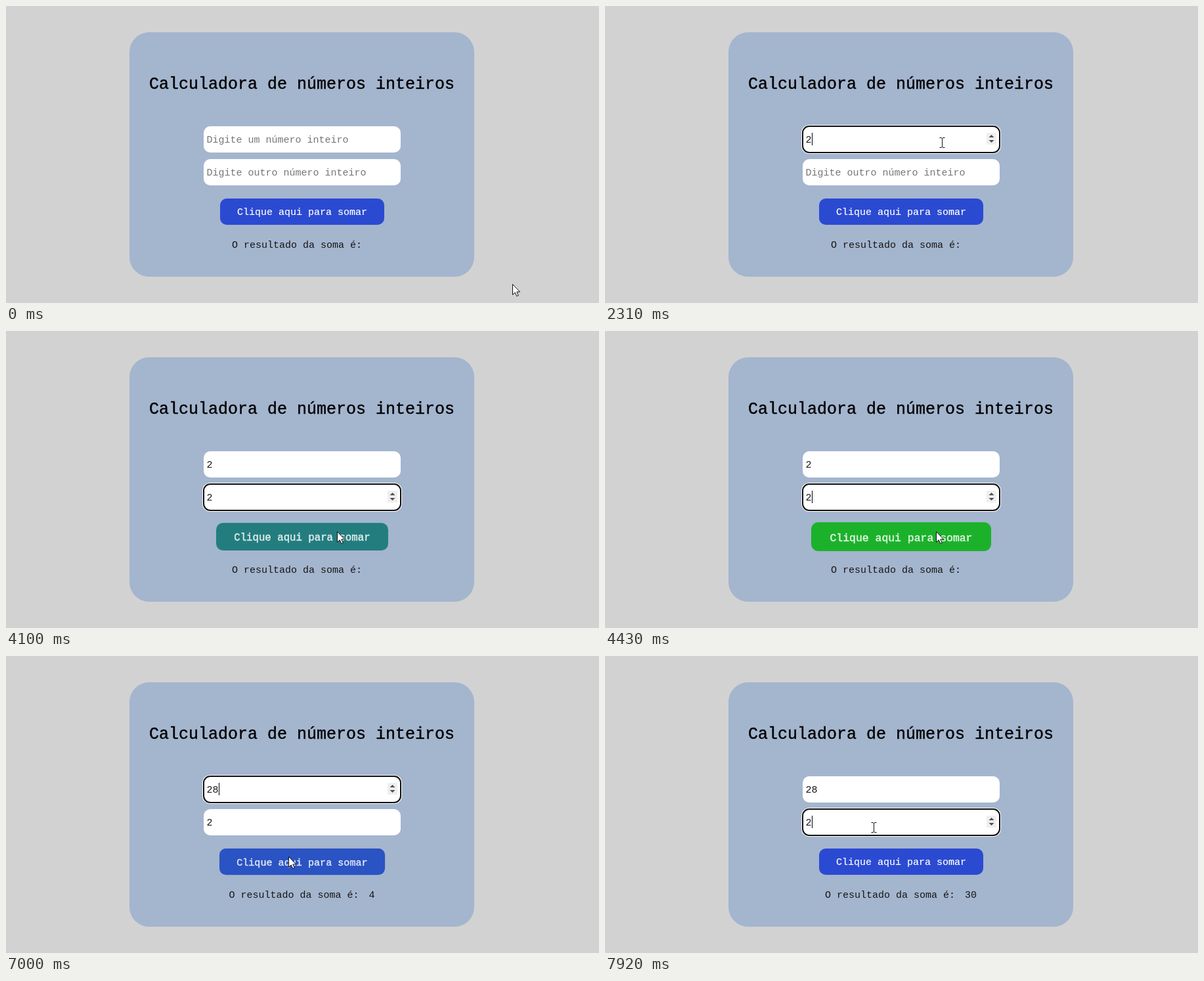
These frames come from a looping animation (903 by 452 pixels, 8 s). An HTML page:

```html
<!DOCTYPE html>
<html lang="pt-BR">
<head>
<meta charset="utf-8">
<title>Calculadora de números inteiros</title>
<style>
  html, body { margin: 0; width: 100%; height: 100%; overflow: hidden; background: #d2d2d2; }
  svg { display: block; }
  text { font: 15px "Liberation Mono", monospace; white-space: pre; fill: #161616; }
  .title { font-size: 25px; fill: #000; stroke: #000; stroke-width: .4px; }
  .hint { fill: #757575; }
  .button { transform-box: fill-box; transform-origin: center; }
  .button text { fill: #fff; stroke: #fff; stroke-width: .2px; }
  .button.hover text { opacity: .86; stroke-width: .45px; }
</style>
</head>
<body>
<svg width="903" height="452" viewBox="0 0 903 452">
  <defs>
    <g id="field">
      <g class="ring">
        <rect x="-2" y="-2" width="304" height="44" rx="12" fill="#fff"/>
        <rect width="300" height="40" rx="10" fill="#fff" stroke="#101010" stroke-width="2"/>
      </g>
      <rect class="plain" width="300" height="40" rx="10" fill="#fff"/>
      <g class="spinner">
        <rect x="280" y="10" width="15" height="18" fill="#efefef"/>
        <path d="M283.5 17l4-4 4 4zM283.5 21l4 4 4-4z" fill="#505050"/>
      </g>
      <text class="value" x="4.5" y="25"></text>
      <rect class="caret" y="10" width="1" height="19"/>
    </g>
  </defs>
  <rect width="903" height="452" fill="#d2d2d2"/>
  <rect x="188" y="40" width="525" height="372" rx="30" fill="#a4b5ce"/>
  <text class="title" x="218" y="126">Calculadora de números inteiros</text>
  <g id="fields"></g>
  <g class="button">
    <rect x="326" y="293" width="250" height="40" rx="10" fill="rgb(43,74,210)"/>
    <text x="352" y="318">Clique aqui para somar</text>
  </g>
  <text id="label" y="368">O resultado da soma é:</text>
  <text id="sum" y="368"></text>
  <g id="pointer">
    <path id="arrow" d="M.5 .5V16.5L4.2 13 6.8 18.6 9.3 17.5 6.8 12H11.6Z" fill="#fff" stroke="#111"/>
    <path id="beam" d="M-3.5 -7.5H-1L.5 -6.5 2 -7.5H4.5M.5 -6.5V6.5M-3.5 7.5H-1L.5 6.5 2 7.5H4.5" fill="none" stroke="#111"/>
  </g>
</svg>
<script>
const LOOP = 8000, TICK = 66, HOVER_MS = 700, BLINK = 8;
const $ = s => document.querySelector(s);

// Pointer strokes, each eased: from tick, to tick, end point
const origin = { x: 771, y: 423 };
const strokes = [
  { from: 0, to: 3, x: 805, y: 393 },
  { from: 10, to: 18, x: 505, y: 203 },
  { from: 20, to: 21, x: 513, y: 208 },
  { from: 37, to: 41, x: 505, y: 243 },
  { from: 54, to: 61, x: 504, y: 305 },
  { from: 79, to: 81, x: 457, y: 269 },
  { from: 81, to: 86, x: 400, y: 213 },
  { from: 100, to: 106, x: 430, y: 305 },
  { from: 113, to: 118, x: 409, y: 261 }
];
// What the user does: a click lands where the pointer is, a key goes to the focused field
const actions = [
  { tick: 19 }, { tick: 35, key: '2' },
  { tick: 43 }, { tick: 51, key: '2' },
  { tick: 72 },
  { tick: 89 }, { tick: 99, key: '8' },
  { tick: 112 },
  { tick: 119 }
];

const smooth = u => u * u * (3 - 2 * u);
const inside = (p, x, y, w, h) => p.x >= x && p.x < x + w && p.y >= y && p.y < y + h;
const show = (el, on) => { el.style.display = on ? '' : 'none'; };

const fields = ['Digite um número inteiro', 'Digite outro número inteiro'].map((hint, i) => {
  const g = $('#field').cloneNode(true);
  const y = 183 + 50 * i;
  g.removeAttribute('id');
  g.setAttribute('transform', `translate(301 ${y})`);
  $('#fields').append(g);
  const part = name => g.querySelector('.' + name);
  return {
    hint, y, ring: part('ring'), plain: part('plain'), spinner: part('spinner'),
    text: part('value'), caret: part('caret')
  };
});

const button = $('.button');
const timing = { duration: HOVER_MS, easing: 'ease', fill: 'both' };
const growth = [
  button.animate({ transform: ['scale(1)', 'scale(1.1)'] }, timing),
  button.querySelector('rect').animate({ fill: ['rgb(43,74,210)', 'rgb(27,181,36)'] }, timing)
];
growth.forEach(a => a.pause());

function pointerAt(tick) {
  let { x, y } = origin;
  for (const s of strokes) {
    if (tick <= s.from) break;
    const u = smooth(Math.min(1, (tick - s.from) / (s.to - s.from)));
    x += (s.x - x) * u;
    y += (s.y - y) * u;
  }
  return { x: Math.round(x), y: Math.round(y) };
}

const fieldUnder = p => fields.findIndex(f => inside(p, 301, f.y, 300, 40));
const overButton = tick => inside(pointerAt(tick), 326, 293, 250, 40);

// Replays every action up to the given tick
function stateAt(tick) {
  const state = { values: ['', ''], focus: -1, sum: '', caretSince: 0 };
  for (const a of actions) {
    if (a.tick > tick) break;
    state.caretSince = a.tick;
    if (a.key) {
      state.values[state.focus] += a.key;
    } else {
      state.focus = fieldUnder(pointerAt(a.tick));
      const released = tick > a.tick;
      if (overButton(a.tick) && released) state.sum = String(+state.values[0] + +state.values[1]);
    }
  }
  return state;
}

function hoverTicks(tick) {
  let n = 0;
  while (n < tick && overButton(tick - n)) n++;
  return n;
}

function render(time) {
  const tick = Math.floor(time / TICK);
  const pointer = pointerAt(tick);
  const { values, focus, sum, caretSince } = stateAt(tick);
  const caretOn = Math.floor((tick - caretSince) / BLINK) % 2 === 0;
  const over = fieldUnder(pointer);

  fields.forEach((f, i) => {
    const focused = focus === i;
    show(f.ring, focused);
    show(f.plain, !focused);
    show(f.spinner, focused || over === i);
    show(f.caret, focused && caretOn);
    f.caret.setAttribute('x', 5 + 9 * values[i].length);
    f.text.textContent = values[i] || f.hint;
    f.text.classList.toggle('hint', !values[i]);
  });

  const hovered = hoverTicks(tick);
  button.classList.toggle('hover', hovered > 0);
  button.querySelector('text').setAttribute('y', hovered ? 319 : 318);
  growth.forEach(a => { a.currentTime = Math.min(Math.max(0, hovered - 1) * TICK, HOVER_MS); });

  const left = 450.5 - (213 + 9 * sum.length) / 2;
  $('#label').setAttribute('x', left);
  $('#sum').setAttribute('x', left + 213);
  $('#sum').textContent = sum;

  $('#pointer').setAttribute('transform', `translate(${pointer.x} ${pointer.y})`);
  show($('#arrow'), over < 0);
  show($('#beam'), over >= 0);
}

const start = performance.now();
function frame() {
  render((performance.now() - start) % LOOP);
  requestAnimationFrame(frame);
}
frame();
</script>
</body>
</html>
```
